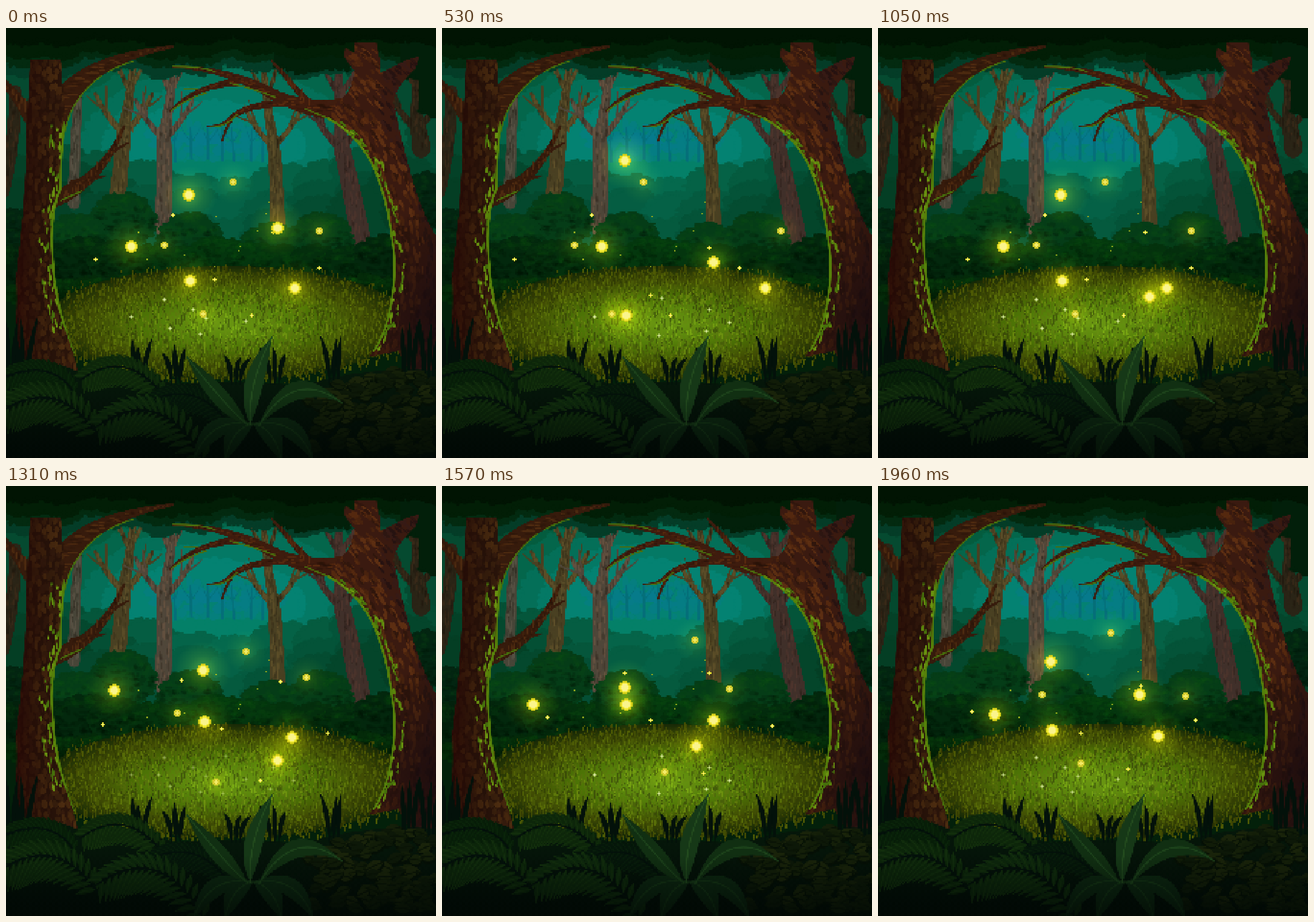
An HTML page with a canvas that plays this animation: 748 px wide and 748 px high, repeating every 2.09 s.

```html
<!DOCTYPE html>
<html lang="en">
<head>
<meta charset="utf-8">
<title>Firefly glade</title>
<style>
html, body { margin: 0; height: 100%; overflow: hidden; background: #021008; }
canvas { display: block; width: 100vw; height: 100vh; image-rendering: pixelated; }
</style>
</head>
<body>
<canvas id="view" width="300" height="300"></canvas>
<script>
const SIZE = 748, CELLS = 300, U = SIZE / CELLS, TAU = Math.PI * 2;
const newCanvas = n => Object.assign(document.createElement('canvas'), { width: n, height: n });
const art = newCanvas(SIZE), g = art.getContext('2d');
const still = newCanvas(CELLS), sg = still.getContext('2d');
const c = document.getElementById('view').getContext('2d');

let seed = 4711;
function rnd(a = 0, b = 1) {
  seed = seed * 16807 % 2147483647;
  return a + (b - a) * seed / 2147483647;
}
const pick = list => list[Math.floor(rnd(0, list.length))];
const quad = (a, b, d, t) => (1 - t) * (1 - t) * a + 2 * t * (1 - t) * b + t * t * d;
const rgb = (list, k = 1) => `rgb(${list.map(v => v * k)})`;
const mix = (a, b, t) => a.map((v, i) => v + (b[i] - v) * Math.max(0, Math.min(1, t)));

function oval(x, y, rx, ry, col, turn = 0) {
  g.fillStyle = col;
  g.beginPath();
  g.ellipse(x, y, rx, ry, turn, 0, TAU);
  g.fill();
}
function shape(d, col) {
  g.fillStyle = col;
  g.fill(new Path2D(d));
}
function line(d, col, w) {
  g.strokeStyle = col;
  g.lineWidth = w;
  g.stroke(new Path2D(d));
}
function ramp(grad, stops) {
  stops.forEach((s, i) => grad.addColorStop(i / (stops.length - 1), s));
  return grad;
}
const glow = (ctx, x, y, r, ...stops) => ramp(ctx.createRadialGradient(x, y, 0, x, y, r), stops);

// Round foliage mass with a ragged edge
function bush(x, y, rx, ry, col, textured) {
  oval(x, y, rx, ry, col);
  const n = (rx + ry) * 0.6;
  for (let i = 0; i < n; i++) {
    const a = rnd(0, TAU);
    oval(x + rx * Math.cos(a), y + ry * Math.sin(a), rnd(3, 9), rnd(2, 6), col);
  }
  for (let i = 0; textured && i < n * 2; i++) {
    const a = rnd(0, TAU), r = Math.sqrt(rnd()), s = Math.sin(a) * r;
    const tone = s < rnd(-0.7, 0.2) ? 'rgba(20,100,20,.10)' : 'rgba(0,15,0,.16)';
    oval(x + rx * r * Math.cos(a), y + ry * s, rnd(3, 8), rnd(2, 5), tone);
  }
}
function canopy(x0, x1, y, amp, col) {
  for (let x = x0; x <= x1; x += 4) {
    const h = y + amp * Math.sin(x / 37) + amp * 0.6 * Math.sin(x / 13) + rnd(-4, 4);
    g.fillStyle = col;
    g.fillRect(x - 4, 0, 9, h);
    oval(x, h, rnd(3, 8), rnd(2, 5), col);
  }
}
// Tapered curved branch with bark flecks
function limb(x0, y0, cx, cy, x1, y1, w0, w1, [col, light]) {
  const n = Math.hypot(x1 - x0, y1 - y0), steep = Math.abs(y1 - y0) > Math.abs(x1 - x0), flecks = [];
  for (let i = 0; i <= n; i++) {
    const t = i / n, x = quad(x0, cx, x1, t), y = quad(y0, cy, y1, t), r = (w0 + (w1 - w0) * t) / 2;
    oval(x, y, r, r, col);
    if (r > 2.5 && i % 3 === 0) flecks.push([x + rnd(-r, r) * 0.75, y + rnd(-r, r) * 0.4, r]);
  }
  for (const [x, y, r] of flecks)
    oval(x, y, steep ? 1.5 : r * 0.5, steep ? rnd(4, 9) : 1.5, rnd() < 0.5 ? light : 'rgba(20,12,5,.2)');
}
function grow(x, y, angle, len, w, cols, depth) {
  const x1 = x + len * Math.sin(angle), y1 = y - len * Math.cos(angle);
  limb(x, y, (x + x1) / 2 + len * angle * 0.2, (y + y1) / 2, x1, y1, w, w * 0.45, cols);
  if (depth) for (const s of [-1, 1])
    grow(x + (x1 - x) * 0.6, y + (y1 - y) * 0.6, angle + s * rnd(0.3, 0.6), len * 0.5, w * 0.4, cols, depth - 1);
}
function tree(x, y, fx, fy, w, lean, cols) {
  limb(x, y, (x + fx) / 2 + 3, (y + fy) / 2, fx, fy, w, w * 0.8, cols);
  grow(fx, fy + 5, lean, fy - 55, w * 0.72, cols, 1);
  for (const s of [-1, 1]) grow(fx, fy + 12, s * 0.62, 85, w * 0.42, cols, 1);
}
function leaf(x0, y0, cx, cy, x1, y1, w, col, rib) {
  const l = Math.hypot(x1 - x0, y1 - y0) || 1, nx = (y0 - y1) / l * w, ny = (x1 - x0) / l * w;
  shape(`M${x0} ${y0}Q${cx + nx} ${cy + ny} ${x1} ${y1}Q${cx - nx} ${cy - ny} ${x0} ${y0}`, col);
  if (rib) line(`M${x0} ${y0}Q${cx} ${cy} ${x1} ${y1}`, rib, 2.5);
}
function frond(x0, y0, cx, cy, x1, y1, len, col, rib) {
  for (let i = 1; i < 18; i++) {
    const t = i / 18, x = quad(x0, cx, x1, t), y = quad(y0, cy, y1, t);
    const dir = Math.atan2((1 - t) * (cy - y0) + t * (y1 - cy), (1 - t) * (cx - x0) + t * (x1 - cx));
    const l = len * (0.35 + 0.9 * Math.sin(Math.PI * (0.12 + t * 0.8)));
    for (const s of [-1, 1]) {
      const a = dir + s * 0.85, ex = x + l * Math.cos(a), ey = y + l * Math.sin(a) + l * 0.3;
      leaf(x, y, (x + ex) / 2, (y + ey) / 2 - 4, ex, ey, 11, col, rib);
    }
  }
  line(`M${x0} ${y0}Q${cx} ${cy} ${x1} ${y1}`, '#03100a', 3);
}
function inside(path, paint) {
  g.save();
  g.clip(path);
  paint();
  g.restore();
}

function distance() {
  g.fillStyle = '#054a30';
  g.fillRect(0, 0, SIZE, SIZE);
  const far = [4, 92, 62], near = [4, 130, 114], blue = [6, 122, 142];
  for (let i = 0; i < 5; i++)
    bush(375 - i * 3, 205, 320 - i * 42, 185 - i * 27, rgb(mix(far, near, i / 4)));
  for (let i = 0; i < 110; i++) {
    const a = rnd(0, TAU), r = Math.sqrt(rnd());
    oval(360 + 125 * r * Math.cos(a), 196 + 34 * r * Math.sin(a), rnd(4, 14), rnd(4, 10), rgb(mix(blue, near, r * 0.7)));
  }
  for (let x = 295; x < 450; x += rnd(15, 30)) grow(x, 238, rnd(-0.1, 0.1), 65, 5, ['#06707a', '#06707a'], 1);
  for (let x = 215; x < 520; x += 35) bush(x, 258 + rnd(-6, 6), 32, 24, '#048068');
  for (let tier = 0; tier < 3; tier++)
    for (let x = 20; x < 780; x += 76) {
      const off = Math.abs(x - 385);
      bush(x + rnd(-12, 12), 305 + tier * 34 - off * 0.2 + rnd(-9, 9), 58, 42,
        rgb(mix([5, 106, 78], [4, 62, 36], off / 480 + tier * 0.17)));
    }
}

function backTrees() {
  const grey = ['#484639', '#565042'], gold = ['#4a4123', '#5b4d28'], rose = ['#50473a', '#62503f'];
  const dark = ['#40302a', '#4c342c'], dusk = ['#2b2517', '#382918'];
  limb(118, 305, 118, 190, 131, 58, 21, 13, grey);
  tree(192, 305, 205, 172, 30, 0.14, gold);
  tree(272, 346, 275, 182, 29, 0.13, rose);
  tree(472, 345, 465, 195, 26, -0.12, gold);
  tree(622, 392, 582, 198, 35, -0.02, dark);
  tree(722, 210, 714, 165, 32, 0, dusk);
  limb(-4, 285, 15, 210, 16, 110, 20, 22, dusk);
}

function hedges() {
  g.fillStyle = '#03200a';
  g.fillRect(0, 385, SIZE, 260);
  for (const [x, y] of [[205, 335], [320, 370], [122, 372], [548, 370], [462, 388], [10, 365], [738, 300]])
    bush(x, y, 54, 47, x > 100 && x < 700 ? '#053c17' : '#032511', true);
  for (let x = 20; x < 760; x += 58) {
    const off = Math.abs(x - 385) / 385;
    bush(x, 405 + rnd(-12, 12), 48, 33, rgb(mix([4, 56, 14], [3, 32, 12], off)), true);
    bush(x + 25, 438 + 25 * off, 46, 20, '#042a09', true);
  }
}

function meadow() {
  const core = [106, 150, 18], rim = [64, 74, 3], n = 7200;
  g.save();
  g.translate(385, 513);
  g.scale(1, 0.31);
  oval(0, 0, 318, 318, glow(g, 0, 0, 318, rgb(core), '#5c880c', '#4b7005', '#414c04', '#162806'));
  g.restore();
  for (let i = 0; i < n; i++) {
    const x = 75 + rnd(0, 620), y = 413 + 205 * i / n;
    const d = Math.hypot((x - 385) / 312, (y - 515) / 99);
    if (d > 1 + rnd(-0.12, 0.12)) continue;
    g.fillStyle = rgb(mix(core, rim, d * 1.05), pick([0.72, 0.85, 1, 1, 1.2]));
    g.fillRect(Math.floor(x / U) * U, Math.floor(y / U) * U, U, Math.round(rnd(1, 4)) * U);
  }
}

function treetops() {
  canopy(0, SIZE, 74, 8, '#043c27');
  canopy(0, SIZE, 57, 7, '#032a10');
  canopy(470, 600, 67, 6, '#02200a');
  canopy(0, SIZE, 44, 6, '#021e06');
  canopy(690, SIZE, 88, 10, '#021f0a');
  canopy(722, SIZE, 140, 9, '#021f0a');
  canopy(0, SIZE, 22, 5, '#011403');
}

// Thin lit rim with mossy flecks on its inner side
function moss(x0, y0, cx, cy, x1, y1, side) {
  line(`M${x0} ${y0}Q${cx} ${cy} ${x1} ${y1}`, '#55800a', 4);
  const n = Math.hypot(x1 - x0, y1 - y0) / 6;
  for (let i = 0; i < n; i++) {
    const t = rnd(), lean = -Math.atan2(2 * (x1 - x0), 2 * (y1 - y0));
    oval(quad(x0, cx, x1, t) + side * rnd(1, 22), quad(y0, cy, y1, t),
      rnd(1, 2.4), rnd(3, 8), pick(['#5b850b', '#46700b', '#6a9410']), lean);
  }
}

function leftTree() {
  const bark = ['#371c0d', '#4d2a10'];
  limb(42, 155, 25, 125, -6, 92, 24, 11, bark);
  limb(82, 158, 118, 58, 290, 33, 48, 5, bark);
  limb(80, 298, 165, 270, 206, 170, 30, 4, bark);
  limb(165, 235, 190, 210, 213, 200, 7, 3, bark);
  limb(115, 270, 145, 265, 173, 257, 11, 3, bark);
  const trunk = new Path2D('M43 55H95Q98 90 101 140Q95 220 95 278Q78 320 80 380Q84 470 104 525L128 605H8Q22 520 18 430Q36 290 36 170Z');
  g.fillStyle = '#2a140a';
  g.fill(trunk);
  inside(trunk, () => {
    for (let y = 52; y < 610; y += 12)
      for (let x = 12; x < 130; x += 11)
        oval(x + rnd(-4, 4), y + rnd(-4, 4), rnd(3, 6), rnd(5, 9), pick(['#44260e', '#3a200d', '#4c2c10', '#351b0d']), rnd(-0.3, 0.3));
    g.fillStyle = ramp(g.createLinearGradient(15, 0, 100, 0), ['rgba(38,6,4,.85)', 'rgba(30,8,4,.35)', 'rgba(0,0,0,0)']);
    g.fillRect(0, 0, 140, 620);
  });
  moss(101, 165, 95, 220, 95, 278, -1);
  moss(95, 278, 78, 320, 80, 380, -1);
  moss(80, 380, 84, 470, 104, 525, -1);
  line('M101 185Q112 122 165 84M178 76Q200 64 222 58M95 300L132 283M104 525L118 565', '#47700b', 2.5);
}

function rightTree() {
  const bark = ['#3f1d0f', '#56290f'];
  limb(605, 138, 540, 150, 470, 118, 40, 18, bark);
  limb(475, 121, 390, 70, 290, 68, 20, 3, bark);
  limb(400, 95, 330, 100, 284, 145, 13, 3, bark);
  limb(520, 132, 420, 125, 385, 162, 15, 7, bark);
  limb(390, 160, 372, 172, 349, 171, 7, 3, bark);
  limb(392, 160, 382, 175, 376, 197, 6, 3, bark);
  limb(525, 130, 495, 95, 462, 57, 13, 3, bark);
  const trunk = new Path2D('M606 26L644 25Q652 55 652 78L698 55 718 50 713 70Q675 105 674 130Q690 205 703 250Q722 320 748 362V605L700 595 682 562 632 572Q674 510 676 410Q668 300 635 232Q605 180 560 157L575 130Q603 112 606 75L588 50 590 34 606 44Z');
  g.fillStyle = '#3a1a10';
  g.fill(trunk);
  inside(trunk, () => {
    for (let i = 0; i < 1150; i++) {
      const x = rnd(545, 748), y = rnd(20, 605);
      const edge = Math.max(600, 676 - (400 - y) ** 2 / (y < 400 ? 700 : 800));
      const tones = x - edge > 52 ? ['#2d1611', '#361a15', '#261210'] : ['#54280f', '#48220e', '#30160c', '#5c2e12'];
      oval(x, y, rnd(1.5, 4), rnd(4, 11), pick(tones), (y - 430) / 420);
    }
    g.fillStyle = glow(g, 760, 500, 190, 'rgba(18,8,12,.75)', 'rgba(25,10,12,.45)', 'rgba(0,0,0,0)');
    g.fillRect(540, 250, 208, 360);
  });
  moss(560, 157, 605, 180, 635, 232, 0.6);
  moss(635, 232, 668, 300, 676, 410, 0.8);
  moss(676, 410, 674, 510, 640, 562, 0.8);
  line('M291 67Q340 67 362 76M310 106H334M288 143Q315 122 350 112M390 96Q430 105 468 120M354 172Q385 172 402 150M520 140L560 157', '#4a6d0d', 2.5);
}

function foreground() {
  shape('M0 585Q70 570 130 600Q220 590 290 620Q400 612 520 622Q610 590 748 595V748H0Z',
    ramp(g.createLinearGradient(0, 590, 0, 748), ['#06180a', '#020b06']));
  for (const x of [5, 30, 232, 295, 400, 468, 570, 700, 735]) {
    const h = 40 + Math.abs(x - 385) * 0.2;
    for (let i = -1; i < 2; i++) {
      const tip = x + i * 20 + rnd(-8, 8);
      leaf(x + i * 7, 622, x + i * 8, 600 - h / 3, tip, 612 - h * rnd(0.8, 1.1), 9, '#03110a');
    }
  }
  frond(120, 640, 85, 570, -10, 610, 30, '#071d08', '#0a240a');
  frond(285, 655, 215, 550, 130, 612, 32, '#0d260a', '#122e0c');
  frond(390, 690, 330, 610, 250, 650, 28, '#05160a', '#081d0b');
  frond(165, 715, 90, 595, -20, 675, 44, '#0c250a', '#122e0d');
  frond(350, 765, 275, 610, 155, 695, 42, '#0d270c', '#122e0d');
  for (let i = 0; i < 120; i++) {
    const y = 600 + i * 1.15, x = rnd(Math.max(525, 620 - i * 2), 748), s = pick([-1, 1]);
    const ex = x + s * rnd(22, 34), ey = y + rnd(-16, 14);
    leaf(x, y, (x + ex) / 2, (y + ey) / 2 + 2, ex + s * 2, ey + 3, 21, '#050f05');
    leaf(x, y, (x + ex) / 2, (y + ey) / 2 - 2, ex, ey, 17, pick(['#141f09', '#111c08', '#0d1808', '#19230a']), '#0a1406');
  }
  for (let i = 0; i < 4; i++) {
    const side = i < 2 ? -1 : 1, far = i % 2 ? 50 : 105;
    leaf(430, 688, 430 + side * far * 0.75, 675 + 20 * (i % 2), 430 + side * far, 755, 32, '#0d2711', '#163716');
  }
  leaf(420, 690, 375, 650, 314, 572, 30, '#112f12', '#1d431b');
  leaf(440, 692, 500, 590, 584, 652, 32, '#112f12', '#1d431b');
  leaf(425, 690, 420, 620, 463, 537, 32, '#163817', '#234b1e');
  g.fillStyle = ramp(g.createLinearGradient(0, 640, 0, 748), ['rgba(1,8,4,0)', 'rgba(1,8,4,.72)']);
  g.fillRect(0, 640, SIZE, 108);
}

g.lineCap = 'round';
[distance, backTrees, hedges, meadow, treetops, leftTree, rightTree, foreground].forEach(paint => paint());
sg.imageSmoothingEnabled = false;
sg.drawImage(art, 0, 0, CELLS, CELLS);

// Each light: x, y, quarter turns, phase in steps
const bigFlies = [[318, 290, 0, 0], [218, 380, 1, 8], [472, 408, 2, 12], [320, 440, 0, 8], [502, 452, 3, 0]];
const smallFlies = [[395, 268, 3, 8], [275, 377, 3, 8], [545, 352, 1, 8], [342, 497, 3, 8]];
const sparks = [[290, 325, 3, 8], [155, 402, 3, 8], [545, 417, 3, 8], [427, 500, 3, 8], [362, 437, 0, 8], [465, 355, 0, 8]];
const flowers = [
  [[275, 472], [218, 502], [285, 522], [325, 490], [347, 505], [337, 532], [417, 510]],
  [[382, 470], [265, 502], [465, 490], [500, 512], [460, 527], [377, 535]]
];
const motes = Array.from({ length: 10 }, () => [rnd(200, 550), rnd(285, 440)]);
const cell = v => Math.floor(v / U);

// Figure of eight: even pace on the long axis, sine across it
function place([x, y, turns, phase], step, scale) {
  const a = (step + phase) * TAU / 16;
  let dx = 25 * scale * Math.sin(2 * a), dy = -60 * scale * Math.asin(Math.sin(a)) / (TAU / 4);
  for (let i = 0; i < turns; i++) [dx, dy] = [dy, -dx];
  return [cell(x + dx), cell(y + dy)];
}
function disc(x, y, r, col) {
  c.fillStyle = col;
  for (let j = -r; j <= r; j++) {
    const w = Math.floor(Math.sqrt((r + 0.4) ** 2 - j * j));
    c.fillRect(x - w, y + j, 2 * w + 1, 1);
  }
}
function halo(x, y, r, alpha) {
  c.globalCompositeOperation = 'lighter';
  c.fillStyle = glow(c, x + 0.5, y + 0.5, r, `rgba(150,140,0,${alpha})`, `rgba(120,120,0,${alpha * 0.36})`, 'rgba(90,100,0,0)');
  c.fillRect(x - r, y - r, 2 * r, 2 * r);
  c.globalCompositeOperation = 'source-over';
}
function cross(x, y, col, heart) {
  disc(x, y, 1, col);
  disc(x, y, 0, heart);
}

function draw(now) {
  const t = now % 2090, step = t < 400 ? Math.min(2, Math.floor(t / 130)) : Math.floor((t - 10) / 130);
  c.drawImage(still, 0, 0);
  flowers.forEach((set, i) => {
    c.globalAlpha = 0.75 * ((1 + Math.cos((step - 4 * i) * TAU / 8)) / 2) ** 1.4;
    for (const [x, y] of set) cross(cell(x), cell(y), '#b5d06c', '#eef2bc');
  });
  c.globalAlpha = 1;
  for (const [x, y] of motes) disc(cell(x), cell(y), 0, '#8fa51c');
  const big = bigFlies.map(f => place(f, step, 1)), little = smallFlies.map(f => place(f, step, 0.76));
  for (const [x, y] of big) halo(x, y, 20, 0.5);
  for (const [x, y] of little) halo(x, y, 15, 0.25);
  for (const f of sparks) cross(...place(f, step, 0.48), '#e3df32', '#fbf48a');
  for (const [x, y] of little) {
    disc(x, y, 2, '#d3cb2c');
    disc(x, y, 1, '#f4ec6a');
  }
  for (const [x, y] of big) {
    disc(x, y, 4, '#d2cc18');
    disc(x, y, 3, '#f5ee3a');
    disc(x, y, 2, '#faf48c');
  }
  requestAnimationFrame(draw);
}
requestAnimationFrame(draw);
</script>
</body>
</html>
```
